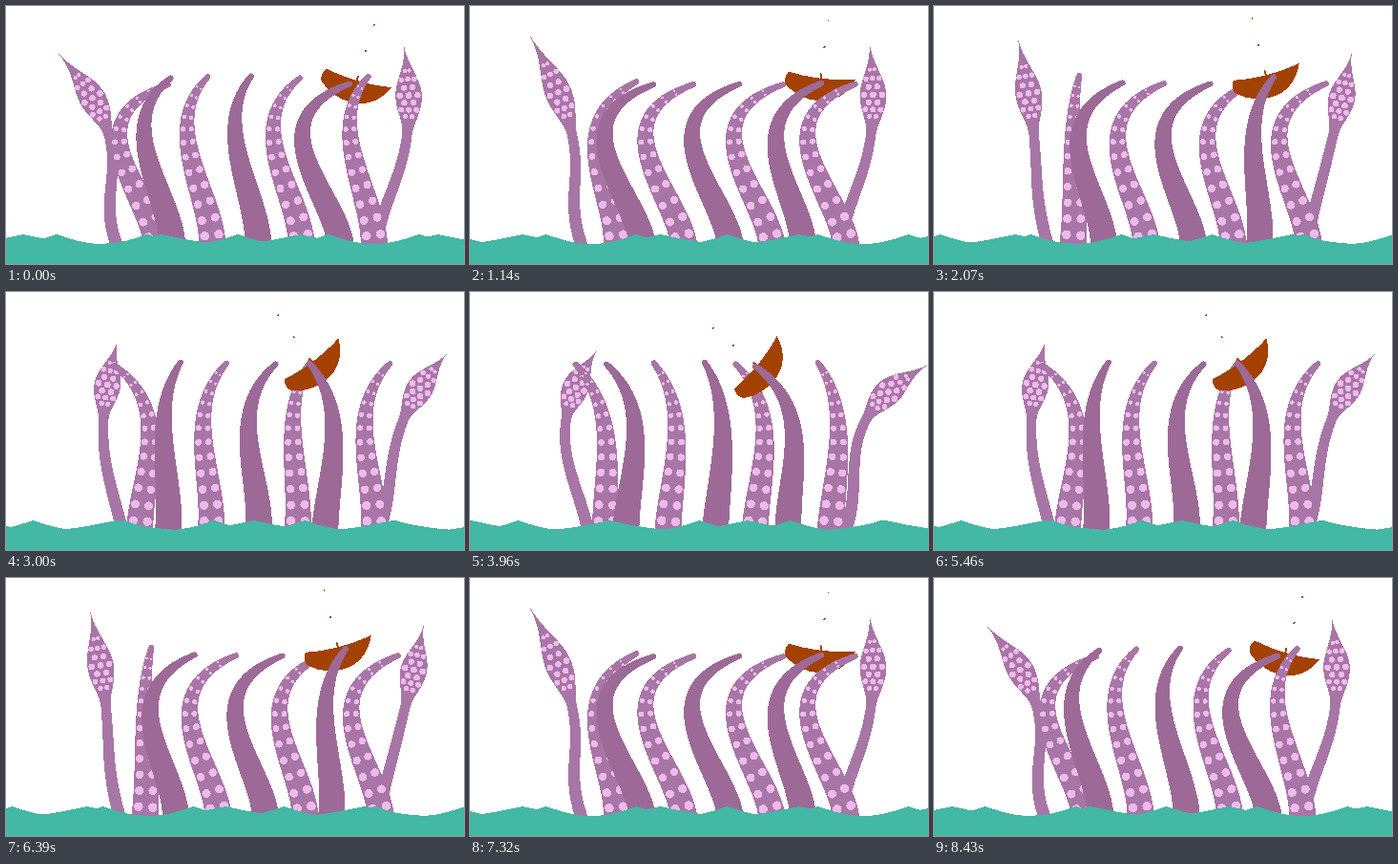
Recreate the animation shown at these times as an HTML page. Size 480 by 270 pixels, loop 8460 ms.

```html
<!DOCTYPE html>
<html lang="en">
<head>
<meta charset="utf-8">
<title>Tentacles</title>
<style>
  html, body { margin: 0; width: 100%; height: 100%; overflow: hidden; background: #fff; }
  svg { display: block; width: 100vw; height: 100vh; shape-rendering: crispEdges; }
</style>
</head>
<body>
<svg id="stage" viewBox="0 0 480 270"></svg>
<script>
const LOOP = 8460, STEP = 30;
const COLORS = { light: '#a876a6', dark: '#9d6a97', spot: '#efb9ec', boat: '#a34200', water: '#42b8a5' };
const stage = document.getElementById('stage');

function add(tag, attrs, parent = stage) {
  const node = document.createElementNS('http://www.w3.org/2000/svg', tag);
  for (const name in attrs) node.setAttribute(name, attrs[name]);
  return parent.appendChild(node);
}

const swing = (t, mid, amp, speed, peak) => mid + amp * Math.cos(speed * (t - peak));

// Cubic through four values spaced evenly over s = 0..1.
function through([a, b, c, d], s) {
  const u = 3 * s;
  return -a * (u - 1) * (u - 2) * (u - 3) / 6 + b * u * (u - 2) * (u - 3) / 2
    - c * u * (u - 1) * (u - 3) / 2 + d * u * (u - 1) * (u - 2) / 6;
}

// Spines return the x and y of four joints, from the sea floor to the tip.
const armSpine = (x, lead) => time => {
  const t = time + lead;
  const base = swing(t, x, 9, 1, 1.43);
  const low = swing(t, x - 8, -7, 1, 0.9);
  const high = swing(t, x - 15.5, -15.5, 1, 0.9);
  const tip = swing(t, x - 3, 34, 1, 1.8) + 7 * Math.cos(2 * t);
  const tipY = 72.5 + (tip - high) ** 2 / 260; // the tip drops as it bends
  return [[base, low, high, tip], [247, 190, 130, tipY]];
};

const clubSpine = ([base, low, high], tipX, tipY) => t => {
  const tip = swing(t, ...tipX), pull = tip - tipX[0];
  return [
    [base + 0.1 * pull, low - 0.05 * pull, high - 0.08 * pull, tip],
    [247, 190, 133, swing(t, ...tipY)]
  ];
};

const armWidth = s => 28 - 10 * s - 12 * s * s;

function clubWidth(s) {
  const head = Math.max(0, (s - 0.66) / 0.34), fade = Math.max(0, (s - 0.84) / 0.16);
  const stalk = (13 - 4 * s) * (1 - fade * fade * (3 - 2 * fade));
  return stalk + 18 * Math.sin(Math.PI * head) ** 2;
}

// Spots sit at s along the spine and at a sideways offset.
function armSpots() {
  const spots = [];
  for (let s = 0.045; s < 0.97; s += 0.03 + 0.0026 * armWidth(s)) {
    const w = armWidth(s);
    for (const side of [-1, 1]) spots.push({ s, offset: side * 0.27 * w, r: 0.18 * w - 0.2 });
  }
  return spots;
}

function clubSpots() {
  const spots = [];
  for (let row = 0; row < 7; row++) {
    const s = 0.745 + row * 0.029, w = clubWidth(s);
    const columns = row % 2 ? [-0.34, 0, 0.34] : [-0.18, 0.18];
    for (const c of columns) spots.push({ s, offset: c * w, r: 1.2 + 0.075 * w });
  }
  return spots;
}

function makeTentacle(spine, fill, width, spots = []) {
  const body = add('path', { fill });
  const dots = spots.map(({ r }) => add('circle', { r: r.toFixed(2), fill: COLORS.spot }));
  // Starts a little below the base so that the water hides the end.
  const samples = Array.from({ length: 54 }, (_, i) => (i - 3) / 50);

  return t => {
    const [xs, ys] = spine(t);
    const place = (s, offset) => {
      const dx = through(xs, s + 0.005) - through(xs, s - 0.005);
      const dy = through(ys, s + 0.005) - through(ys, s - 0.005);
      const k = offset / Math.hypot(dx, dy);
      return [through(xs, s) - dy * k, through(ys, s) + dx * k].map(v => v.toFixed(2));
    };
    const edge = side => samples.map(s => place(s, side * width(s) / 2).join(' '));
    const r = width(1) / 2;
    body.setAttribute('d', `M${edge(-1).join('L')}A${r} ${r} 0 0 1 ${edge(1).reverse().join('L')}Z`);
    dots.forEach((dot, i) => {
      const [x, y] = place(spots[i].s, spots[i].offset);
      dot.setAttribute('cx', x);
      dot.setAttribute('cy', y);
    });
  };
}

function makeBoat() {
  const group = add('g', { fill: COLORS.boat });
  add('path', { d: 'M-34-2C-38 2-38 8-36 12C-26 21-14 26 0 26C15 26 29 18 37 0C20 3-8 4-34-2Z' }, group);
  add('rect', { x: -1, y: -3, width: 2, height: 6 }, group);
  add('rect', { x: 0.2, y: -31.3, width: 2, height: 2 }, group);
  add('rect', { x: 2, y: -59.3, width: 1.6, height: 1.6 }, group);
  return t => {
    const x = swing(t, 334, 38, 0.8, 0.55), y = swing(t, 73, -3, 1.5, 2.3);
    const angle = swing(t, -19.5, 34, 0.75, 0.1);
    group.setAttribute('transform', `translate(${x} ${y}) rotate(${angle})`);
  };
}

// Two scalloped waves scrolling at different speeds.
function makeWater() {
  const path = add('path', { fill: COLORS.water });
  const crest = (x, start, spacing) => 1 - Math.abs(Math.sin(Math.PI * (x - start) / spacing));
  return t => {
    let d = 'M0 270';
    for (let x = 0; x <= 480; x += 2) {
      const rise = Math.max(crest(x, 53 + 23.4 * t, 95), crest(x, 18 + 32.3 * t, 145));
      d += `L${x} ${(249 - 10 * rise).toFixed(2)}`;
    }
    path.setAttribute('d', d + 'L480 270Z');
  };
}

const light = (x, lead) => makeTentacle(armSpine(x, lead), COLORS.light, armWidth, armSpots());
const dark = (x, lead) => makeTentacle(armSpine(x, lead), COLORS.dark, armWidth);
const club = (...shape) => makeTentacle(clubSpine(...shape), COLORS.light, clubWidth, clubSpots());

// Back to front.
const parts = [
  club([119, 108, 104], [94, -41, 0.8, 0.3], [44, -16, 1.3, 1.45]),
  club([391, 404, 418], [449, -35, 0.8, 0.5], [57.5, -21, 0.8, 0.7]),
  light(149, 1.3), dark(171.5, 0.15), light(215, 0), dark(264, -0.1), light(307, 0.15),
  makeBoat(),
  dark(342, 1), light(385, -0.05),
  makeWater()
];

// The motion runs forwards for half the loop, then backwards.
function render(ms) {
  const time = Math.floor(ms % LOOP / STEP) * STEP;
  const t = (LOOP / 2 - Math.abs(LOOP / 2 - time)) / 1000;
  parts.forEach(update => update(t));
}

const start = performance.now();
function tick() {
  render(performance.now() - start);
  requestAnimationFrame(tick);
}
tick();
</script>
</body>
</html>
```
